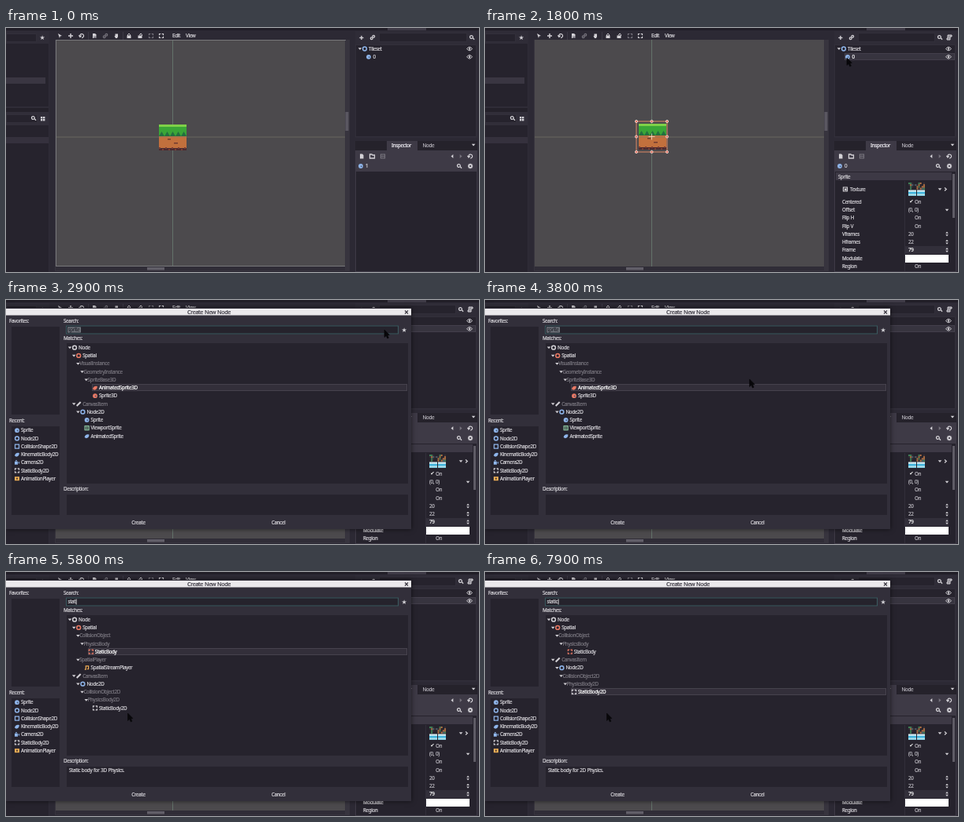
Recreate the animation shown at these times as an HTML page with a canvas. Size 600 px wide and 311 px high, loop 8 s.

```html
<!DOCTYPE html>
<html>
<head>
<meta charset="utf-8">
<style>
html, body { margin: 0; width: 100%; height: 100%; overflow: hidden; background: #2c2934; }
canvas { display: block; }
</style>
</head>
<body>
<canvas id="stage" width="600" height="311"></canvas>
<script>
const ctx = document.getElementById('stage').getContext('2d');
const LOOP = 8000;
const FG = '#d3d1d6', DIM = '#77747d', PANEL = '#26232d', WINDOW = '#2f2c37', LIGHT = '#3e3a46';
const EDGE = '#322f3a', BLUE = '#8fb5ea', RED = '#e87964', GREEN = '#8cc5a0', ORANGE = '#efad55';

// ---- drawing helpers ----
function box(x, y, w, h, fill, line) {
  if (fill) { ctx.fillStyle = fill; ctx.fillRect(x, y, w, h); }
  if (line) { ctx.strokeStyle = line; ctx.lineWidth = 1; ctx.strokeRect(x + .5, y + .5, w - 1, h - 1); }
}
function text(s, x, y, color = FG, align = 'left', size = 6.3) {
  ctx.font = `${size}px "Noto Sans", "Open Sans", sans-serif`;
  ctx.letterSpacing = '-0.35px';
  ctx.wordSpacing = '0.5px';
  ctx.textAlign = align;
  ctx.fillStyle = ctx.strokeStyle = color;
  ctx.lineWidth = .22;
  ctx.fillText(s, x, y + size * .36);
  ctx.strokeText(s, x, y + size * .36);
}
function glyph(s, x, y, size = 8, color = FG) {
  ctx.font = `bold ${size}px "DejaVu Sans", sans-serif`;
  ctx.letterSpacing = '0px';
  ctx.textAlign = 'center';
  ctx.fillStyle = color;
  ctx.fillText(s, x, y + size * .36);
}
function path(d, x, y, { fill, stroke, width = 1 } = {}) {
  const p = new Path2D(d);
  ctx.save();
  ctx.translate(x, y);
  if (fill) { ctx.fillStyle = fill; ctx.fill(p); }
  if (stroke) { ctx.strokeStyle = stroke; ctx.lineWidth = width; ctx.stroke(p); }
  ctx.restore();
}
function circle(x, y, r, fill, stroke, width = 1.2) {
  ctx.beginPath();
  ctx.arc(x, y, r, 0, 7);
  if (fill) { ctx.fillStyle = fill; ctx.fill(); }
  if (stroke) { ctx.strokeStyle = stroke; ctx.lineWidth = width; ctx.stroke(); }
}
const down = (x, y, c = FG) => path('M-2.3-1.3H2.3L0 1.6Z', x, y, { fill: c });
const search = (x, y) => path('M1 .5A1.9 1.9 0 1 1 1 -1.5A1.9 1.9 0 0 1 1 .5L3 2.8', x, y, { stroke: FG, width: 1.3 });
const turn = (x, y) => path('M-2 1A2.4 2.4 0 1 1 0 2.4M-3.6-.6L-2 1.6L-.4-.4', x, y, { stroke: FG, width: 1.2 });
const eye = y => {
  path('M-3.4 0Q0-4.6 3.4 0Q0 4.6-3.4 0Z', 588, y, { stroke: FG });
  circle(588, y, 1.2, FG);
};
const link = (x, y, c = FG) => {
  circle(x - 1.3, y + 1.2, 1.4, null, c);
  circle(x + 1.3, y - 1.2, 1.4, null, c);
};
const page = (x, y, c = FG) => path('M-2-3H1L2.5-1.5V3H-2Z', x, y, { fill: c });
function gear(x, y) {
  circle(x, y, 1.9, null, FG, 1.6);
  path('M-3.2 0H-2M2 0H3.2M0-3.2V-2M0 2V3.2M-2.3-2.3L-1.5-1.5M1.5 1.5L2.3 2.3M-2.3 2.3L-1.5 1.5M1.5-1.5L2.3-2.3',
    x, y, { stroke: FG, width: 1.2 });
}

const icons = {
  ring: (x, y, c) => circle(x, y, 2.4, null, c, 1.5),
  ball: (x, y, c) => { circle(x, y, 2.9, c); circle(x + .7, y + .3, .9, '#4a5974'); },
  frame: (x, y, c) => path('M-2.5-2.5H2.5V2.5H-2.5Z', x, y, { stroke: c, width: 1.2 }),
  corners: (x, y, c) => {
    ctx.setLineDash([3.6, 1.4]);
    ctx.lineDashOffset = 1.8;
    icons.frame(x, y, c);
    ctx.setLineDash([]);
  },
  oval: (x, y, c) => path('M-3 1.5Q-2-3 2.8-2Q3 2-1 2.7Z', x, y, { fill: c }),
  grid: (x, y, c) => { icons.frame(x, y, c); path('M-2 0H2M0-2V2', x, y, { stroke: c, width: .7 }); },
  film: (x, y, c) => { box(x - 3, y - 2.5, 6, 5, c); box(x - 1, y - 1, 2, 2, '#5e4630'); },
  cam: (x, y, c) => path('M-3-1.5H1V2.5H-3ZM1.5 0L3-1.5V2ZM-2-3H0V-2H-2Z', x, y, { fill: c }),
  brush: (x, y, c) => path('M-2.5 2.5L2.5-2.5', x, y, { stroke: c, width: 2 }),
  note: (x, y, c) => path('M-1.3 2V-2.3H2V1.5M-2.8 2H-.8M.5 1.5H2.5', x, y, { stroke: c, width: 1.2 }),
};

// ---- main editor ----
function toolbar() {
  path('M-2-3L3 0L.6.6L0 3Z', 68, 10, { fill: FG });
  path('M-3 0H3M0-3V3', 82, 10, { stroke: FG, width: 1.4 });
  turn(96, 10);
  page(112, 10);
  path('M-1 1H3M-1 2.5H3', 112, 10, { stroke: '#55515e', width: .8 });
  link(126, 10, DIM);
  path('M-2.5 0L-1.5 0V-2.5H2V1L1 3H-1Z', 140, 10, { fill: FG });
  for (const x of [156, 170]) {
    box(x - 2.5, 9.5, 5, 3.5, FG);
    path(x < 160 ? 'M-1.5 0V-1.5Q0-4.2 1.5-1.5V0' : 'M-.2-1V-2Q1.2-4.2 2.5-1.5V0', x, 10, { stroke: FG });
  }
  icons.corners(184, 10, DIM);
  icons.corners(197, 10, FG);
  box(104, 5, 1, 10, '#3c3945');
  box(148, 5, 1, 10, '#3c3945');
  text('Edit', 211, 10);
  text('View', 228, 10);
}

function leftDock() {
  box(0, 4, 55, 307, WINDOW);
  box(0, 7, 39, 11, PANEL, EDGE);
  glyph('★', 46, 12, 8);
  box(0, 20, 54, 80, PANEL);
  box(0, 63, 50, 8, '#3a3642');
  box(0, 102, 54, 5, '#24212a');
  box(0, 107, 54, 204, '#312e39');
  box(0, 110, 40, 11, PANEL, EDGE);
  search(35, 115);
  for (const x of [44, 47]) for (const y of [113, 116]) box(x, y, 2.4, 2.4, FG);
  box(0, 124, 54, 187, PANEL);
  box(0, 139, 54, 8, '#35313d');
}

function tile(x, y) {
  box(x, y, 35, 15, '#3aa637');
  box(x, y, 35, 3, '#7fd048');
  box(x, y + 15, 35, 15, '#c2703d');
  for (let i = 0; i < 5; i++) {
    path('M-3.5 3L0-3L3.5 3Z', x + 3.5 + i * 7, y + 12, { fill: '#246f40' });
  }
  box(x, y + 30, 35, 3, '#4b2b30');
  for (let i = 0; i < 9; i++) box(x + i * 4, y + 29 + i % 2 * 2, 2, 2, '#7b3d33');
  box(x + 11, y + 18, 4, 1.5, '#713b30');
  box(x + 19, y + 23, 5, 1.5, '#713b30');
}

function viewport(selected) {
  box(62, 15, 374, 295, '#37343e');
  box(63, 15, 367, 289, '#4c4a4d');
  box(211, 15, 1, 289, '#64736b');
  if (selected) tile(195, 122); else tile(194, 123);
  box(63, 138.5, 367, 1, 'rgba(128,124,110,.55)');
  if (selected) {
    box(191.5, 118.5, 40, 40, null, '#df8a66');
    box(207.5, 138, 8, 1, 'rgba(245,225,205,.75)');
    box(211, 134.5, 1, 8, 'rgba(245,225,205,.75)');
    for (const x of [192, 211.5, 231]) for (const y of [119, 138.5, 158]) {
      if (x !== 211.5 || y !== 138.5) circle(x, y, 1.6, '#ea6a58', '#ecd9d3', .9);
    }
  } else {
    box(63, 15, 368, 289, null, '#77777a');
  }
  box(430, 16, 5, 288, '#37343e');
  box(430.5, 107, 4, 24, '#5a5761');
  box(63, 304, 367, 5, '#302d37');
  box(179, 305, 22, 3.5, '#625f69');
}

function sceneDock(selected) {
  box(443, 4, 155, 136, WINDOW);
  glyph('✚', 451, 12, 7);
  link(465, 12);
  box(473, 6, selected ? 98 : 112, 12, PANEL, EDGE);
  search(selected ? 577 : 591, 12);
  if (selected) path('M-2-3H3V-1H1V3H-3V1H-2Z', 589, 12, { fill: '#8f8c95', stroke: FG });
  box(443, 21, 154, 118, PANEL, EDGE);
  if (selected) box(456, 32, 140, 9, '#37343f', '#433f4b');
  down(449, 26.5);
  icons.ring(455, 26.5, BLUE);
  text('Tileset', 460, 26.5);
  icons.ball(460, 36.8, BLUE);
  text('0', 465.5, 36.8, selected ? '#fff' : FG);
  eye(26.5);
  eye(36.8);
}

function inspector(selected) {
  box(443, 144, 155, 12, '#25222b');
  box(483, 144, 39, 13, LIGHT);
  text('Inspector', 489, 150, '#eceaf0');
  text('Node', 528.5, 150, '#b0adb5');
  down(593, 149);
  box(443, 156, 155, 155, LIGHT);
  page(451, 163.5);
  path('M-3-2.5H-.5L.5-1.5H3V2.5H-3Z', 464.5, 163.5, { stroke: FG, width: 1.3 });
  icons.grid(478, 163.5, DIM);
  path('M1.3-2.5V2.5L-1.5 0Z', 566, 163.5, { fill: FG });
  path('M-1.3-2.5V2.5L1.5 0Z', 577, 163.5, { fill: DIM });
  turn(589, 163.5);
  icons.ball(450, 176, BLUE);
  text(selected ? '0' : '1', 456, 176);
  search(575, 176);
  gear(589, 176);
  box(444, 183, 153, 127, PANEL);
  if (selected) properties();
}

function properties() {
  box(445, 184, 147, 10, '#3d3945');
  box(593, 186, 3, 56, '#5f5c66');
  text('Sprite', 448, 189.3);
  box(532, 195, 1, 115, EDGE);
  icons.frame(457, 205.5, FG);
  box(456, 204.5, 2.5, 2.5, FG);
  text('Texture', 463, 205.5);
  const shades = ['#3f7f56', '#b37143', '#342f38', '#50656f', PANEL];
  for (let i = 0; i < 40; i++) {
    const noise = Math.abs(Math.sin(i * 12.9) * 437) % 1;
    box(537 + i % 10 * 2.1, 197 + (i / 10 | 0) * 2.2, 2.1, 2.2, shades[noise * 5 | 0]);
  }
  for (const x of [537, 548]) {
    box(x, 207, 10, 7, '#43b5dd');
    box(x, 206.5, 10, 2.3, '#d5ecf0');
    box(x, 211.5, 10, 2, '#b8e2e8');
  }
  down(577, 205.5);
  path('M-1-2L1.3 0L-1 2', 584, 205.5, { stroke: FG, width: 1.2 });
  box(533, 278, 55, 10, EDGE);
  const rows = [['Centered', 'On'], ['Offset', '(0, 0)'], ['Flip H', 'On'], ['Flip V', 'On'],
    ['Vframes', '20'], ['Hframes', '22'], ['Frame', '79'], ['Modulate', ''], ['Region', 'On']];
  rows.forEach(([label, value], i) => {
    const y = 221.5 + i * 10.25;
    text(label, 453, y);
    text(value, value === 'On' ? 545 : 537, y, label === 'Frame' ? '#fff' : '#b9b7be');
    if (i > 3 && i < 7) {
      path('M-1.8-.8L0-3L1.8-.8ZM-1.8.8L0 3L1.8.8Z', 586, y, { fill: FG });
    }
  });
  glyph('✔', 541, 221, 6.5, '#fff');
  down(586, 232);
  box(533, 289, 55, 10, '#fff');
}

// ---- context menu ----
const menuItems = ['Add Child Node|Ctrl+A', 'Instance Child Scene', '', 'Change Type', '',
  'Attach Script', 'Clear Script', '', 'Move Up|Ctrl+Up', 'Move Down|Ctrl+Down', 'Duplicate|Ctrl+D',
  'Reparent', '', 'Merge From Scene', 'Save Branch as Scene', '', 'Copy Node Path|Ctrl+C', '',
  'Delete Node(s)|Delete'];
const menuIcons = '✚∞ ↻ ✎✖ ↑↓⧉↗ ⇄▣ ⎘ ✖';

function menu() {
  box(478, 37, 102, 165, '#25222c', '#38343f');
  box(480, 38, 99, 9, '#45414d');
  menuItems.forEach((item, i) => {
    const y = 42.3 + i * 8.57;
    if (!item) return box(480, Math.round(y), 98, 1, '#4a4651');
    const [label, key] = item.split('|');
    glyph(menuIcons[i], 484, y, 6.5);
    text(label, 489, y);
    if (key) text(key, 578, y, '#96939c', 'right');
  });
}

// ---- node dialog ----
// Each tree row: depth, name, icon, colour. Rows without a colour are dimmed.
const root = [[0, 'Node', 'ring', FG], [1, 'Spatial', 'ring', RED]];
const canvasItem = [[1, 'CanvasItem', 'brush'], [2, 'Node2D', 'ring', BLUE]];
const body3D = [[2, 'CollisionObject'], [3, 'PhysicsBody'], [4, 'StaticBody', 'corners', RED]];
const body2D = [[3, 'CollisionObject2D'], [4, 'PhysicsBody2D'], [5, 'StaticBody2D', 'corners', FG]];
const trees = {
  sprite: [...root, [2, 'VisualInstance'], [3, 'GeometryInstance'], [4, 'SpriteBase3D'],
    [5, 'AnimatedSprite3D', 'oval', RED], [5, 'Sprite3D', 'ball', RED], ...canvasItem,
    [3, 'Sprite', 'ball', BLUE], [3, 'ViewportSprite', 'grid', GREEN], [3, 'AnimatedSprite', 'oval', BLUE]],
  stat: [...root, ...body3D, [2, 'SpatialPlayer'], [3, 'SpatialStreamPlayer', 'note', ORANGE],
    ...canvasItem, ...body2D],
  static: [...root, ...body3D, ...canvasItem, ...body2D],
};
const recent = [['Sprite', 'ball', BLUE], ['Node2D', 'ring', BLUE], ['CollisionShape2D', 'frame', BLUE],
  ['KinematicBody2D', 'oval', BLUE], ['Camera2D', 'cam', BLUE], ['StaticBody2D', 'corners', FG],
  ['AnimationPlayer', 'film', ORANGE]];

function tree(rows, chosen) {
  rows.forEach(([depth, name, icon, color], i) => {
    const x = 81 + depth * 5.2, y = 60.7 + i * 10.25;
    const picked = name === chosen;
    if (picked) box(Math.round(x + 2), Math.round(y - 4.5), 507 - Math.round(x), 9, '#332f3a', '#46424d');
    if (rows[i + 1] && rows[i + 1][0] > depth) down(x, y);
    if (icon) icons[icon](x + 6, y, color || FG);
    text(name, x + (icon ? 11 : 1.8), y, picked ? '#fff' : color ? FG : DIM);
  });
}

function dialog(typed, chosen) {
  ctx.save();
  ctx.shadowColor = 'rgba(0,0,0,.6)';
  ctx.shadowBlur = 6;
  box(0, 10, 514, 282, '#322f3a');
  ctx.restore();
  box(0, 11, 514, 8.5, '#ebe9ec');
  text('Create New Node', 257.5, 15.5, '#38353f', 'center', 7.2);
  path('M-2-2L2 2M2-2L-2 2', 508, 15.5, { stroke: '#38353f', width: 1.1 });

  for (const [label, x, y] of [['Favorites:', 4, 27], ['Recent:', 4, 154], ['Search:', 73, 27],
    ['Matches:', 73, 48.3], ['Description:', 73, 241]]) text(label, x, y);
  for (const [x, y, w, h] of [[6, 33, 63, 114], [6, 160, 63, 115], [76, 54, 435, 181], [76, 247, 435, 28]]) {
    box(x, y, w, h, PANEL, EDGE);
  }
  recent.forEach(([name, icon, color], i) => {
    const y = 166.2 + i * 10.25;
    icons[icon](14, y, color);
    text(name, 19, y);
  });

  box(76, 32.5, 422, 11, '#25232c', '#3b5a60');
  glyph('★', 505, 38, 8);
  if (typed) {
    text(typed, 78.5, 38);
    box(79 + ctx.measureText(typed).width, 34.5, .8, 7, '#fff');
  } else {
    box(78, 34.5, 17, 7, '#737980');
    text('sprite', 78.5, 38, '#26242d');
  }
  tree(trees[!typed ? 'sprite' : typed.length < 5 ? 'stat' : 'static'], chosen);
  if (typed) text(`Static body for ${chosen.endsWith('2D') ? 2 : 3}D Physics.`, 80, 253);
  text('Create', 168, 284, FG, 'center');
  text('Cancel', 345.5, 284, FG, 'center');
}

// ---- timeline ----
const pointerKeys = [[500, 320, 316], [1200, 459, 38], [1900, 459, 38], [2300, 480, 38],
  [3200, 480, 38], [4500, 154.5, 180]];
function pointer(t) {
  let i = 0;
  while (i < pointerKeys.length - 1 && t >= pointerKeys[i + 1][0]) i++;
  const [t0, x0, y0] = pointerKeys[i], [t1, x1, y1] = pointerKeys[i + 1] || [t0 + 1, x0, y0];
  const k = Math.max(0, Math.min(1, (t - t0) / (t1 - t0)));
  const e = k * k * (3 - 2 * k);
  path('M0 0V9.5L2.2 7.6L3.8 11L5.4 10.2L3.9 7L6.4 6.6Z', x0 + (x1 - x0) * e, y0 + (y1 - y0) * e,
    { fill: '#08070a', stroke: '#08070a', width: .6 });
}

function draw(now) {
  const t = now % LOOP;
  const selected = t >= 1300;
  box(0, 0, 600, 311, '#2c2934');
  box(0, 0, 600, 3, '#211e27');
  box(484, 0, 49, 3, LIGHT);
  leftDock();
  viewport(selected);
  toolbar();
  sceneDock(selected);
  inspector(selected);
  if (t >= 2400 && t < 2900) menu();
  if (t >= 2900) {
    const count = t < 5500 ? 0 : Math.min(6, 1 + Math.floor((t - 5500) / 100));
    const chosen = !count ? 'AnimatedSprite3D' : t < 6800 ? 'StaticBody' : 'StaticBody2D';
    dialog('static'.slice(0, count), chosen);
  }
  if (t >= 500) pointer(t);
  requestAnimationFrame(draw);
}
requestAnimationFrame(draw);
</script>
</body>
</html>
```
